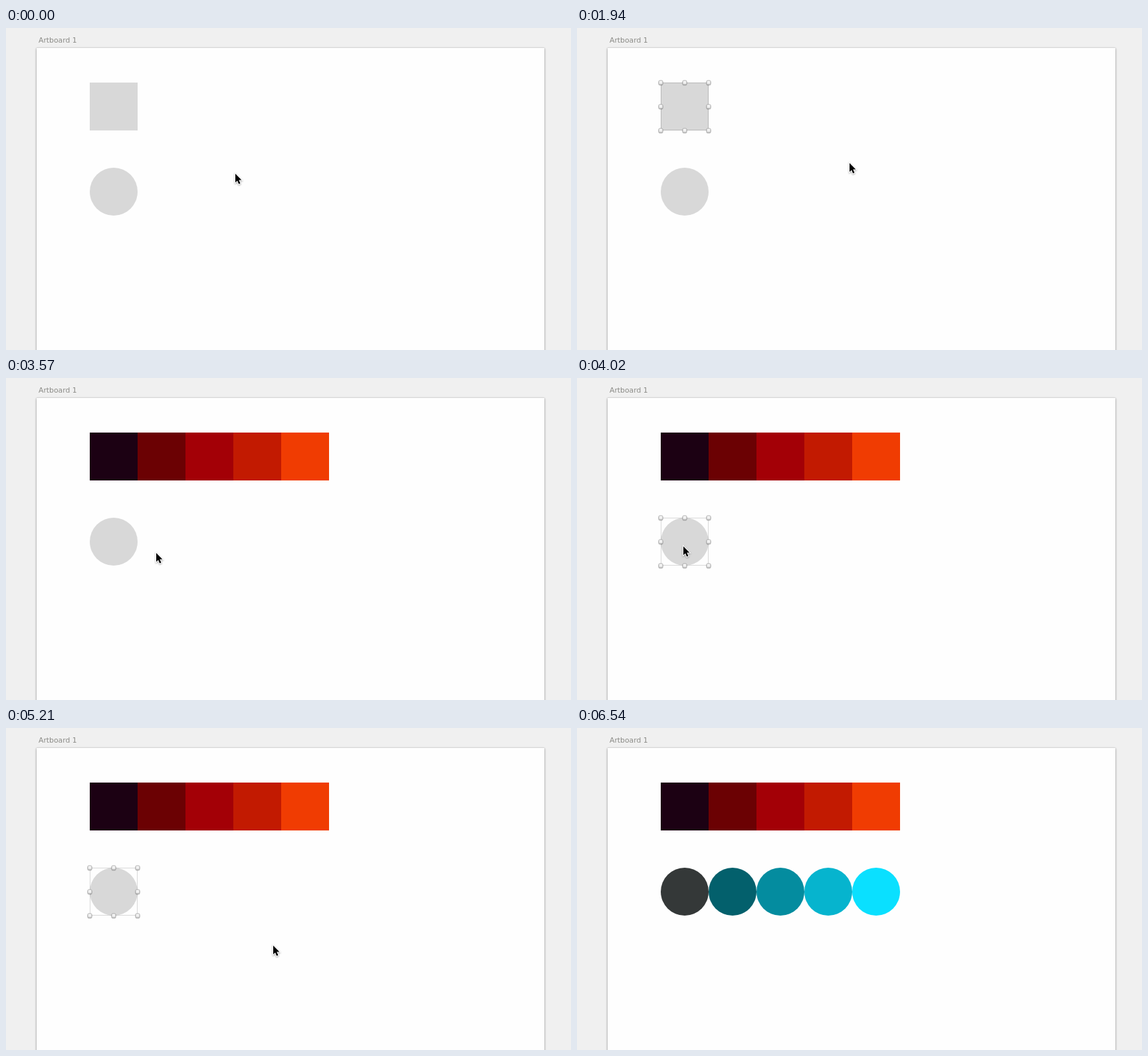
Recreate the animation shown at these times as an HTML page. Size 850 by 484 pixels, loop 7200 ms.

```html
<!DOCTYPE html>
<html lang="en">
<head>
<meta charset="utf-8">
<title>Artboard palettes</title>
<style>
  html, body { margin: 0; width: 100%; height: 100%; overflow: hidden; background: #f0f0f0; }
  #stage { position: relative; width: 850px; height: 484px; overflow: hidden; background: #f0f0f0; }
  #label { position: absolute; left: 49px; top: 12px; font: 10.8px/14px "DejaVu Sans", sans-serif; color: #8a8a86; white-space: pre; }
  #board { position: absolute; left: 46px; top: 30px; width: 764px; height: 480px; background: #fefefe;
           box-shadow: 0 0 1px rgba(0,0,0,.3), 0 1px 3px rgba(0,0,0,.4); }
  svg { position: absolute; left: 0; top: 0; }
  #cursor { filter: drop-shadow(0 1px .8px rgba(0,0,0,.35)); }
</style>
</head>
<body>
<div id="stage">
  <div id="label">Artboard 1</div>
  <div id="board"></div>
  <svg id="art" width="850" height="484" viewBox="0 0 850 484">
    <defs>
      <linearGradient id="knob" x1="0" y1="0" x2="0" y2="1">
        <stop offset="0" stop-color="#fff"/>
        <stop offset="1" stop-color="#e2e2e2"/>
      </linearGradient>
    </defs>
  </svg>
</div>
<script>
const LOOP = 7200, SIZE = 72, LEFT = 126;
const GREY = '#d8d8d8', HOVER = '#62abe8';
const art = document.getElementById('art');

// Each row: palette plus the times of hover, selection and fill.
const rows = [
  { top: 82, round: false, hover: 450, select: 600, fill: 2840,
    colors: ['#1c0113', '#6b0103', '#a30006', '#c21a01', '#f03c02'] },
  { top: 210, round: true, hover: 3720, select: 4020, fill: 5500,
    colors: ['#343838', '#03606c', '#048c9f', '#06b4ce', '#0ae0ff'] }
];

// Pointer steps: time, x, y
const path = [
  [0, 345, 219], [300, 217, 137], [450, 178, 113], [1800, 380, 184], [1940, 410, 203],
  [3140, 418, 207], [3280, 478, 243], [3430, 472, 243], [3570, 226, 263], [3720, 177, 263],
  [3870, 160, 253], [4910, 175, 257], [5060, 402, 326], [5210, 402, 327],
  [5950, 420, 330], [6390, 425, 332]
];
const POINTER_GONE = 6540;

function add(parent, tag, attrs) {
  const el = document.createElementNS('http://www.w3.org/2000/svg', tag);
  for (const k in attrs) el.setAttribute(k, attrs[k]);
  return parent.appendChild(el);
}

function shape(parent, row, i, attrs) {
  const x = LEFT + i * SIZE, r = SIZE / 2;
  return row.round
    ? add(parent, 'circle', { cx: x + r, cy: row.top + r, r, ...attrs })
    : add(parent, 'rect', { x, y: row.top, width: SIZE, height: SIZE, ...attrs });
}

function selection(row) {
  const g = add(art, 'g', {});
  add(g, 'rect', { x: LEFT + .5, y: row.top + .5, width: SIZE - 1, height: SIZE - 1,
    fill: 'none', stroke: '#000', 'stroke-opacity': .15 });
  for (let j = 0; j < 3; j++) for (let i = 0; i < 3; i++) {
    if (i === 1 && j === 1) continue;
    const x = LEFT + i * SIZE / 2 - 3, y = row.top + j * SIZE / 2 - 3;
    add(g, 'rect', { x: x - .5, y: y + .5, width: 7, height: 7, rx: 2, fill: '#000', 'fill-opacity': .22 });
    add(g, 'rect', { x, y, width: 6, height: 6, rx: 1.5, fill: 'url(#knob)', stroke: '#a2a2a2', 'stroke-width': .9 });
  }
  return g;
}

for (const row of rows) {
  row.base = shape(art, row, 0, { fill: GREY });
  row.swatches = add(art, 'g', {});
  row.colors.forEach((fill, i) => shape(row.swatches, row, i, { fill }));
  row.outline = shape(art, row, 0, { fill: 'none', stroke: HOVER, 'stroke-width': 2 });
  row.handles = selection(row);
}

const cursor = add(art, 'g', { id: 'cursor' });
const arrow = 'M0 0V13.2L3 10.4L5.2 15.6L7.5 14.6L5.3 9.6H9.4Z';
add(cursor, 'path', { d: arrow, fill: '#fff', stroke: '#fff', 'stroke-width': 2 });
add(cursor, 'path', { d: arrow, fill: '#000' });

const show = (el, on) => { el.style.display = on ? '' : 'none'; };

function draw(t) {
  for (const row of rows) {
    const filled = t >= row.fill;
    show(row.base, !filled);
    show(row.swatches, filled);
    show(row.outline, t >= row.hover && t < row.select);
    show(row.handles, t >= row.select && !filled);
  }
  const [, x, y] = path.findLast(step => step[0] <= t);
  cursor.setAttribute('transform', `translate(${x} ${y})`);
  show(cursor, t < POINTER_GONE);
}

function tick() {
  draw(performance.now() % LOOP);
  requestAnimationFrame(tick);
}
tick();
</script>
</body>
</html>
```
